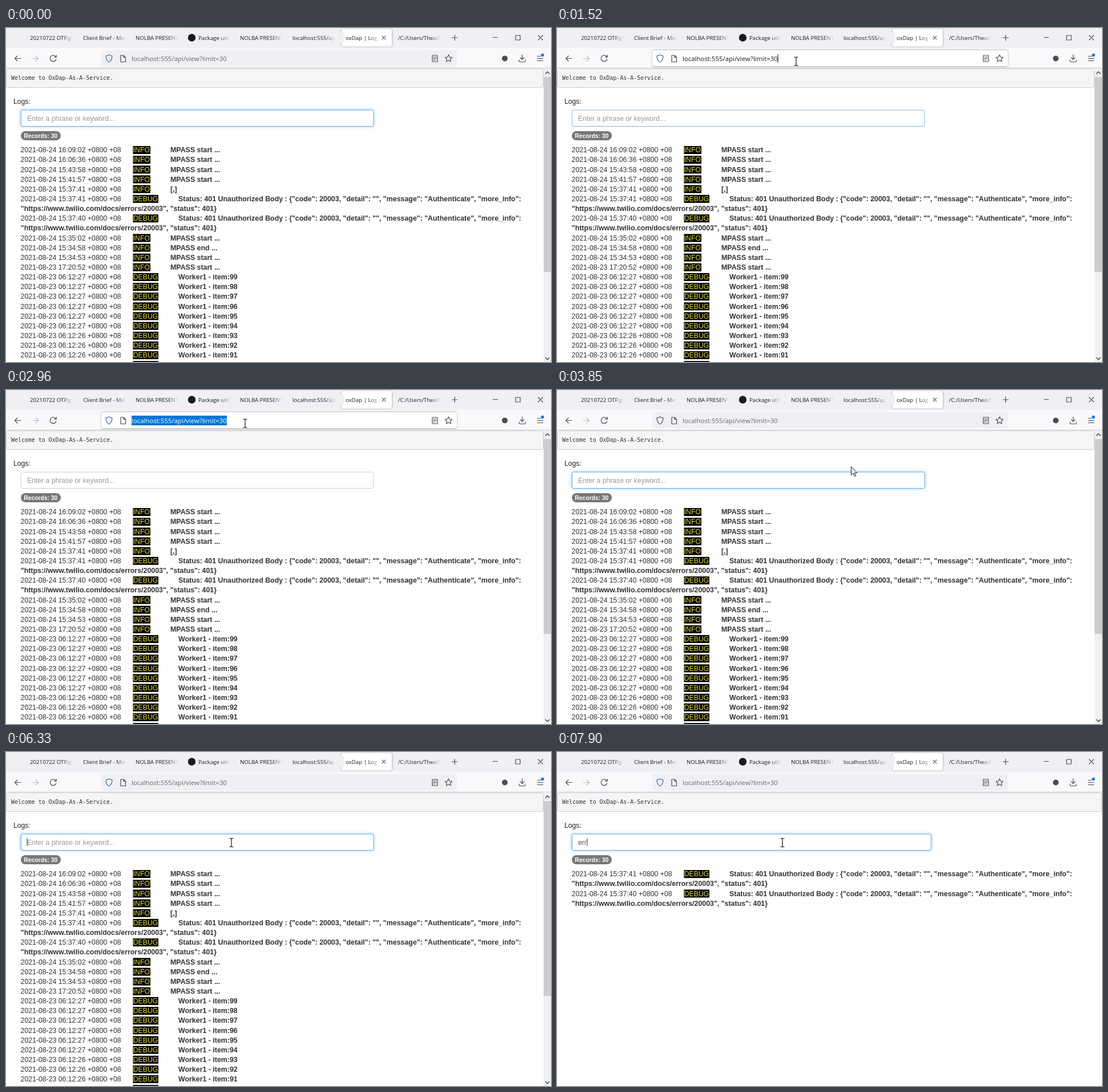
An HTML page that plays this animation: 955x586 px, repeating every 8 s.

```html
<!DOCTYPE html>
<html lang="en">
<head>
<meta charset="utf-8">
<title>Log viewer</title>
<style>
html, body { margin: 0; width: 100%; height: 100%; overflow: hidden; background: #fefefe; }
svg { display: block; width: 955px; height: 586px; }
.ui { font-family: "Open Sans", "Noto Sans", sans-serif; }
.page { font-family: "Liberation Sans", Arial, sans-serif; }
.mono { font-family: "DejaVu Sans Mono", monospace; }
.icon { fill: none; stroke: #4b4b52; stroke-width: 1.2; stroke-linecap: round; stroke-linejoin: round; }
</style>
</head>
<body>
<svg id="stage" viewBox="0 0 955 586">
  <defs>
    <linearGradient id="fadeBar"><stop stop-color="#f0f0f4" stop-opacity="0"/><stop offset="1" stop-color="#f0f0f4"/></linearGradient>
    <linearGradient id="fadeTab"><stop stop-color="#fff" stop-opacity="0"/><stop offset="1" stop-color="#fff"/></linearGradient>
    <filter id="soft" x="-10%" y="-60%" width="120%" height="220%"><feGaussianBlur stdDeviation="2.6"/></filter>
    <filter id="lift" x="-10%" y="-60%" width="120%" height="220%"><feGaussianBlur stdDeviation="1.4"/></filter>
  </defs>
  <rect width="955" height="586" fill="#fefefe"/>
  <g id="page" class="page"></g>
  <g id="chrome" class="ui"></g>
  <g id="pointer"></g>
</svg>
<script>
const LOOP = 8000;
const $ = id => document.getElementById(id);

function add(parent, tag, attrs, content) {
  const el = document.createElementNS("http://www.w3.org/2000/svg", tag);
  for (const key in attrs) el.setAttribute(key, attrs[key]);
  if (content !== undefined) el.textContent = content;
  parent.appendChild(el);
  return el;
}
const label = (parent, x, y, size, fill, content, extra) =>
  add(parent, "text", { x, y, "font-size": size, fill, ...extra }, content);
const box = (parent, x, y, width, height, fill, extra) =>
  add(parent, "rect", { x, y, width, height, fill, ...extra });
const icon = (parent, d, extra) => add(parent, "path", { class: "icon", d, ...extra });
const show = (el, on) => el.setAttribute("visibility", on ? "inherit" : "hidden");

// Value of the last [time, value] step reached.
function at(steps, t) {
  let value = steps[0][1];
  for (const [time, next] of steps) if (time <= t) value = next;
  return value;
}

// Browser chrome
const chrome = $("chrome");
box(chrome, 0, 0, 955, 35, "#f0f0f4");
box(chrome, 0, 35, 955, 35, "#f9f9fb");
box(chrome, 0, 69.5, 955, 1, "#cfcfd4");
box(chrome, 587, 1.5, 89.5, 31, "#777", { rx: 3.5, filter: "url(#lift)", opacity: 0.6 });
box(chrome, 587.5, 1.5, 88.5, 31, "#fff", { rx: 3.5 });

const tabs = [
  [42, "20210722 OTP.gif"], [135, "Client Brief - Mem"], [227, "NOLBA PRESENTA"],
  [337, "Package util"], [410, "NOLBA PRESENTA"], [502, "localhost:555/api"],
  [595, "oxDap | Log E"], [687, "/C:/Users/Theo/Do"]
];
tabs.forEach(([x, title], i) => {
  const active = i === 6;
  const end = active ? 655 : i === 3 ? 393 : x + 75;
  label(chrome, x, 20.8, 9.7, "#1c1b22", title);
  box(chrome, end - 18, 8, 18, 18, active ? "url(#fadeTab)" : "url(#fadeBar)");
  box(chrome, end, 8, active ? 16 : 15, 18, active ? "#fff" : "#f0f0f4");
});
add(chrome, "circle", { cx: 325.5, cy: 17, r: 6.7, fill: "#1b1b1f" });
icon(chrome, "M659.3 14.2l5.6 5.6m0-5.6l-5.6 5.6M781.5 17h9.5m-4.75-4.75v9.5");
icon(chrome, "M853.5 16.5h8M893 13h8v8h-8zM932.5 13l8 8m0-8l-8 8", { "stroke-linecap": "butt", stroke: "#222", "stroke-width": 1.1 });
icon(chrome, "M26 53.5H15.5m4.5-4.5l-4.5 4.5 4.5 4.5");
icon(chrome, "M46 53.5h10.5m-4.500-4.500l4.500 4.500-4.500 4.500", { style: "stroke:#b9b9bf" });
icon(chrome, "M87.300 50.500a5.400 5.400 0 1 0 .5 4.500M88.300 47.500v3.600h-3.600");

const urlShadow = box(chrome, 167, 38.5, 623, 29.5, "#777", { rx: 4, filter: "url(#lift)", opacity: 0.65 });
const urlField = box(chrome, 167, 39, 623, 28, "#f0f0f4", { rx: 3.5 });
const shield = icon(chrome, "M180.500 47c2 1.500 3.600 1.700 5.500 1.900 0 5-1.600 8.600-5.500 11-3.900-2.400-5.500-6-5.500-11 1.900-.2 3.500-.4 5.500-1.900z");
icon(chrome, "M201 48h5l3.500 3.500v8h-8.500zM206 48v3.500h3.500");
const selection = box(chrome, 220, 45, 167, 17, "#0078d7");
const urlText = label(chrome, 220, 58, 11.43, "#65656c", "localhost:555/api/view?limit=30");
const urlCaret = box(chrome, 386.6, 46, 1, 15, "#111");
icon(chrome, "M747 48h9v11h-9zM749 51h5m-5 2.500h5m-5 2.500h3");
icon(chrome, "M775.500 47l1.900 4 4.300.5-3.200 3 .9 4.400-3.900-2.200-3.900 2.200.9-4.400-3.200-3 4.300-.5z");
add(chrome, "circle", { cx: 874, cy: 53.5, r: 5, fill: "#4b4b52" });
icon(chrome, "M904.500 47v8m-3.300-3l3.300 3.300 3.300-3.300M899 56v2q0 1.500 1.500 1.500h8q1.500 0 1.500-1.500v-2");
icon(chrome, "M931 49.500h5.500m-5.500 4h10m-10 4h10");
add(chrome, "circle", { cx: 940, cy: 47.5, r: 2.7, fill: "#0a74dc" });

// Page
const page = $("page");
const well = box(page, 0.5, 71.5, 941, 33, "#f5f5f5", { rx: 3, stroke: "#ccc" });
label(page, 9, 91.3, 9.92, "#333", "Welcome to OxDap-As-A-Service.", { class: "mono" });
label(page, 13, 132.6, 12.2, "#222", "Logs:");
const glow = box(page, 25, 143, 620, 30, "#66afe9", { rx: 4, filter: "url(#soft)" });
const input = box(page, 26.4, 144, 617.6, 28.5, "#fff", { rx: 2.5 });
const placeholder = label(page, 37, 162.6, 12.2, "#999", "Enter a phrase or keyword...");
const typed = label(page, 37, 162.6, 12.2, "#555", "");
const caret = box(page, 37, 151, 1, 14, "#333");
box(page, 26, 181, 70, 16, "#777", { rx: 8 });
label(page, 31.3, 192.7, 10.3, "#fff", "Records: 30", { "font-weight": 700 });

// Log records: [time, level, message, wrapped rest]
const START = "MPASS start ...";
const STATUS = 'Status: 401 Unauthorized Body : {"code": 20003, "detail": "", "message": "Authenticate", "more_info":';
const LINK = '"https://www.twilio.com/docs/errors/20003", "status": 401}';
const records = [
  ["24 16:09:02", "INFO", START], ["24 16:06:36", "INFO", START],
  ["24 15:43:58", "INFO", START], ["24 15:41:57", "INFO", START],
  ["24 15:37:41", "INFO", "[,]"],
  ["24 15:37:41", "DEBUG", STATUS, LINK], ["24 15:37:40", "DEBUG", STATUS, LINK],
  ["24 15:35:02", "INFO", START], ["24 15:34:58", "INFO", "MPASS end ..."],
  ["24 15:34:53", "INFO", START], ["23 17:20:52", "INFO", START]
];
for (let n = 99; n > 80; n--) {
  const second = n > 93 ? 27 : n > 84 ? 26 : 25;
  records.push([`23 06:12:${second}`, "DEBUG", `Worker1 - item:${n}`]);
}

function buildList(query) {
  const list = add(page, "g", {});
  const bold = { "font-weight": 700 };
  let y = 218.3;
  for (const [time, level, message, rest] of records) {
    if (!(message + (rest || "")).toLowerCase().includes(query)) continue;
    const info = level === "INFO";
    label(list, 25.6, y, 12.28, "#333", `2021-08-${time} +0800 +08`);
    box(list, 222.5, y - 11.2, info ? 30.5 : 44.5, 14, "#000");
    label(list, 222.7, y, 12.28, "#e2dc3c", level);
    label(list, info ? 288 : 302, y, 12.4, "#333", message, bold);
    y += 17.143;
    if (rest) {
      label(list, 25.8, y, 12.4, "#333", rest, bold);
      y += 17.143;
    }
  }
  return list;
}
const lists = ["", "e", "er", "err"].map(buildList);

const scrollbar = add(page, "g", {});
box(scrollbar, 942, 70, 13, 516, "#f0f0f0");
const thumb = box(scrollbar, 942, 86, 13, 342, "#cdcdcd");
icon(scrollbar, "M945.500 80l3.300-3.300 3.300 3.300M945.500 578.500l3.300 3.300 3.300-3.300", { style: "stroke-width:1.6" });

// Pointer
const pointer = $("pointer");
const arrow = add(pointer, "path", {
  d: "M.5.5V15.200L4 12l2.400 5.500 2.200-1-2.400-5.200h4.600z", fill: "#fff", stroke: "#111", "stroke-width": 1
});
const beam = add(pointer, "path", {
  d: "M-3.500-7.500h2.500l1 1 1-1h2.500M0-6.500v13M-3.500 7.500h2.500l1-1 1 1h2.500", fill: "none", stroke: "#111", "stroke-width": 1.2
});

// Pointer steps: [time, [x, y, shape]]
const moves = [[0, null], [160, [716, 375, arrow]]];
for (let i = 1; i <= 8; i++) {
  const p = i / 8, ease = p * p * (3 - 2 * p);
  moves.push([257 + i * 113, [716 - 297 * ease, 375 - 313 * ease, i < 8 ? arrow : beam]]);
}
moves.push(
  [1280, [419, 58.500, beam]], [3630, [414, 80, arrow]], [3850, [515, 134, arrow]],
  [3970, [552, 154, beam]], [4190, [562, 157, beam]], [4300, [567, 157, beam]], [4420, [569, 157, beam]],
  [5080, [556, 162, beam]], [5190, [532, 176, arrow]], [5310, [500, 188, arrow]], [5420, [465, 191, arrow]],
  [5540, [432, 184, arrow]], [5650, [408, 173, arrow]], [5760, [393, 160, beam]],
  [5880, [387, 155, beam]], [6000, [395, 159, beam]]
);

const urlSteps = [[0, "idle"], [1390, "caret"], [1630, "selected"], [3190, "idle"]];
const shieldSteps = [[0, "#3b6ca8"], [3190, "#4b4b52"], [3970, "#3b6ca8"]];
const borderSteps = [[0, "#66afe9"], [1520, "#7db5e2"], [1630, "#ccc"], [3190, "#8fbde3"], [3300, "#66afe9"]];
const glowSteps = [[0, 0.6], [1520, 0], [3300, 0.35], [3420, 0.6]];
const caretSteps = [
  [0, false], [370, true], [930, false], [3190, true], [3630, false], [4190, true],
  [4750, false], [5190, true], [5760, false], [6330, true]
];
const typedSteps = [[0, ""], [6900, "e"], [7120, "er"], [7230, "err"]];
const listSteps = [[0, 0], [6900, 1], [7120, 2], [7350, 3]];
const thumbHeights = [342, 430, 443, 0];

function render(t) {
  const url = at(urlSteps, t), focused = url !== "idle", selected = url === "selected";
  show(urlShadow, focused);
  show(selection, selected);
  show(urlCaret, url === "caret");
  urlField.setAttribute("fill", focused ? "#fff" : "#f0f0f4");
  urlText.setAttribute("fill", selected ? "#fff" : focused ? "#1c1b22" : "#65656c");
  shield.style.stroke = at(shieldSteps, t);

  const query = at(typedSteps, t);
  input.setAttribute("stroke", at(borderSteps, t));
  glow.setAttribute("opacity", at(glowSteps, t));
  typed.textContent = query;
  show(placeholder, !query);
  show(caret, at(caretSteps, t));
  caret.setAttribute("x", query ? 37.5 + typed.getComputedTextLength() : 36.5);

  const current = at(listSteps, t), full = current === 3;
  lists.forEach((list, i) => show(list, i === current));
  show(scrollbar, !full);
  thumb.setAttribute("height", thumbHeights[current]);
  well.setAttribute("width", full ? 954 : 941);
  input.setAttribute("width", full ? 629 : 617.6);
  glow.setAttribute("width", full ? 631.500 : 620);

  const pose = at(moves, t);
  show(arrow, pose && pose[2] === arrow);
  show(beam, pose && pose[2] === beam);
  if (pose) pointer.setAttribute("transform", `translate(${pose[0]} ${pose[1]})`);
}

const began = performance.now();
function tick() {
  render((performance.now() - began) % LOOP);
  requestAnimationFrame(tick);
}
tick();
</script>
</body>
</html>
```
